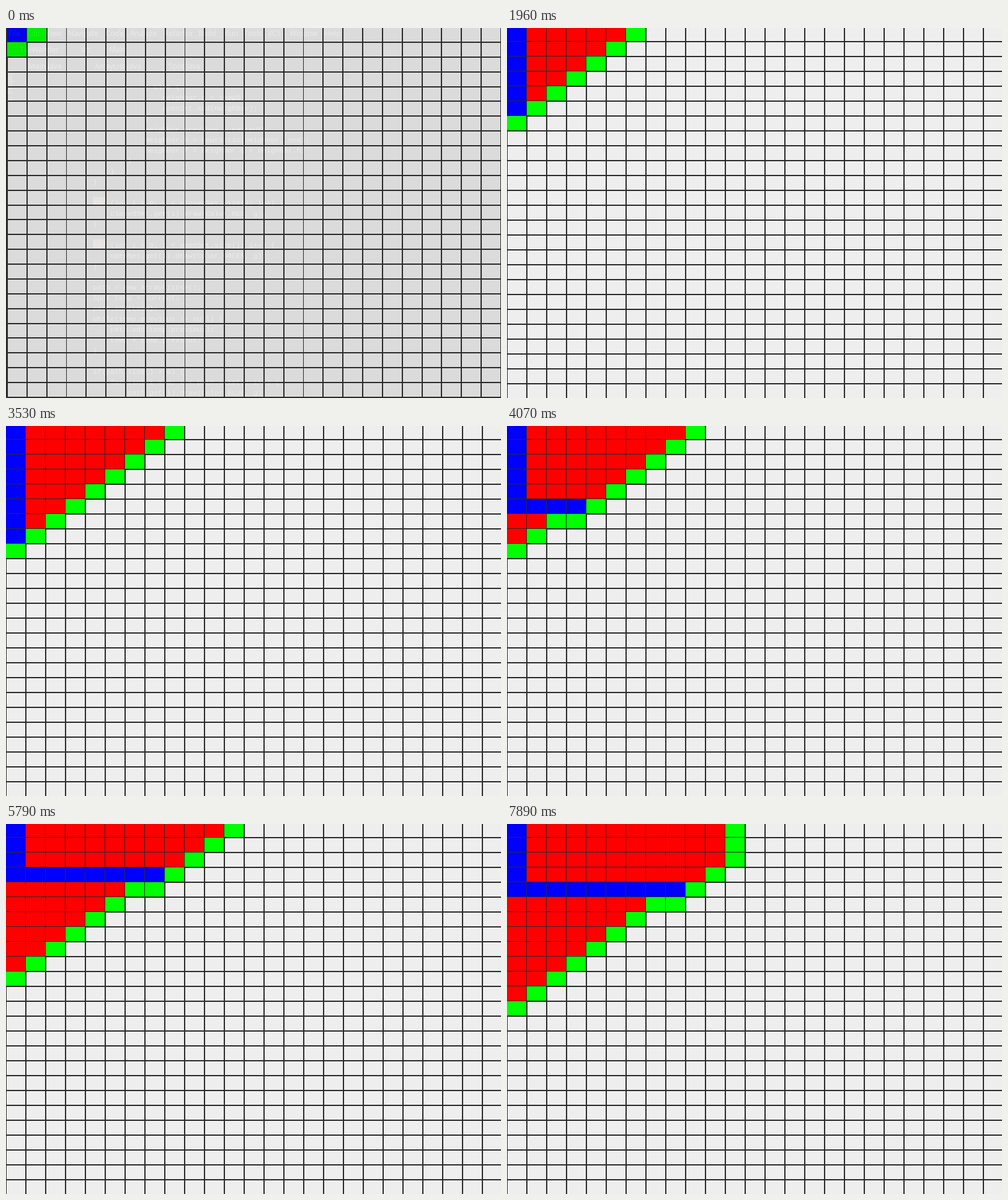
Recreate the animation shown at these times as an HTML page. Size 798 px wide and 597 px high, loop 8000 ms.

```html
<!DOCTYPE html>
<html lang="en">
<head>
<meta charset="utf-8">
<title>Grid search</title>
<style>
  html, body { margin: 0; width: 100%; height: 100%; overflow: hidden; background: #eee; }
  svg { display: block; width: 798px; height: 597px; }
  text { fill: #c4ccd4; white-space: pre; }
  .ui { font: 12px "Open Sans", sans-serif; }
  .code { font: 11.67px "Liberation Mono", monospace; }
</style>
</head>
<body>
<svg viewBox="0 0 798 597">
  <g id="editor">
    <rect width="798" height="597" fill="#2b2b2b"/>
    <rect x="140" y="273" width="20" height="14" fill="#a8795a"/>
    <rect x="140" y="341" width="20" height="14" fill="#a8795a"/>
  </g>
  <g id="board" shape-rendering="crispEdges">
    <rect y="-2" width="802" height="602" fill="#eee"/>
    <path id="grid" stroke="#2b2b2b" stroke-width="2"/>
    <path id="closed" fill="#f00"/>
    <path id="open" fill="#0f0"/>
    <path id="path" fill="#00f"/>
  </g>
</svg>
<script>
const LOOP = 8000, CELL_W = 32, CELL_H = 24, TOP = -2, SIZE = 25, LAST_COL = 10;
const el = id => document.getElementById(id);

// First and last step of each burst; steps inside a burst are evenly spaced.
const bursts = [
  [80, 240], [390, 550], [700, 940], [1090, 1250], [1400, 1640], [1800, 1960],
  [2110, 2350], [2510, 2670], [2820, 3060], [3210, 3370], [3530, 3760], [3910, 4070],
  [4230, 4380], [4540, 4770], [4930, 5090], [5240, 5480], [5630, 5790], [5940, 6180],
  [6330, 6490], [6640, 6880], [7030, 7190], [7340, 7500], [7650, 7890]
];
const steps = bursts.flatMap(([from, to]) => {
  const gaps = Math.round((to - from) / 79);
  return Array.from({ length: gaps + 1 }, (_, i) => from + (to - from) * i / gaps);
});

// The search visits cells diagonal by diagonal, from top right to bottom left.
const order = [];
for (let sum = 0; order.length <= steps.length; sum++)
  for (let col = Math.min(sum, LAST_COL); col >= 0; col--) order.push([col, sum - col]);

const cells = list => list.map(([c, r]) =>
  `M${c * CELL_W} ${r * CELL_H + TOP}h${CELL_W - 1}v${CELL_H - 1}h${1 - CELL_W}z`).join("");

function drawGrid() {
  let d = "";
  for (let i = 0; i <= SIZE; i++)
    d += `M${i * CELL_W} -2V600M0 ${i * CELL_H + TOP}H802`;
  el("grid").setAttribute("d", d);
}

function addText(kind, x, y, content, turn) {
  const node = document.createElementNS("http://www.w3.org/2000/svg", "text");
  node.setAttribute("class", kind);
  node.setAttribute("x", x);
  node.setAttribute("y", y);
  if (turn) node.setAttribute("transform", `rotate(${turn} ${x} ${y})`);
  node.textContent = content;
  el("editor").append(node);
}

function drawEditor() {
  const menu = { File: 4, Edit: 34, View: 64, Navigate: 100, Code: 161, Analyze: 200, Refactor: 255,
    Build: 310, Run: 352, Tools: 384, VCS: 422, Window: 457, Help: 514 };
  for (const name in menu) addText("ui", menu[name], 13, name);
  addText("ui", 22, 39, "TileWander");
  addText("ui", 121, 39, "src");
  addText("ui", 166, 39, "Main");
  addText("ui", 36, 66, "Main.java");
  addText("ui", 143, 66, "ArrayList.java");
  addText("ui", 262, 66, "Spot.java");
  addText("ui", 10, 120, "1: Project", -90);

  const code = `            } else {
                neighbor.g = tempG;
                openSet.add(neighbor);
            }
            neighbor.previous = current;
            neighbor.h = heuristic(neighbor, end);
            neighbor.f = neighbor.g + neighbor.h;
        }
    }
}

for (int i = 0; i < closedSet.size(); i++) {
    closedSet.get(i).draw(Color.RED, g);
}

for (int i = 0; i < openSet.size(); i++) {
    openSet.get(i).draw(Color.GREEN, g);
}

path = new ArrayList<>();
Spot temp = current;
path.add(temp);
while(temp.previous != null) {
    path.add(temp.previous);
    temp = temp.previous;
}

if(path.size() > 0) {
    for (int i = 0; i < path.size(); i++) {
        path.get(i).draw(Color.BLUE, g);`;
  code.split("\n").forEach((line, i) => {
    const text = line.trimStart();
    if (text) addText("code", 140 + 7 * (line.length - text.length), 99 + 17 * i, text);
  });
}

function render(time) {
  const count = 1 + steps.filter(step => step <= time).length;
  const closed = order.slice(0, count);
  const seen = new Set(closed.map(String));
  const open = closed.flatMap(([c, r]) => [[c + 1, r], [c, r + 1]])
    .filter(cell => !seen.has(String(cell)) && seen.add(String(cell)));

  const [col, row] = closed[count - 1];
  const path = [];
  for (let r = 0; r <= row; r++) path.push([0, r]);
  for (let c = 1; c <= col; c++) path.push([c, row]);

  el("closed").setAttribute("d", cells(closed));
  el("open").setAttribute("d", cells(open));
  el("path").setAttribute("d", cells(path));

  // The window is still fading and growing in before the first step.
  const opening = time < steps[0];
  el("editor").style.display = opening ? "" : "none";
  el("board").setAttribute("opacity", opening ? 0.907 : 1);
  el("board").setAttribute("transform", opening ? "translate(2 1) scale(.9948)" : "");
}

drawGrid();
drawEditor();
const start = performance.now();
function tick() {
  render((performance.now() - start) % LOOP);
  requestAnimationFrame(tick);
}
render(0);
requestAnimationFrame(tick);
</script>
</body>
</html>
```
